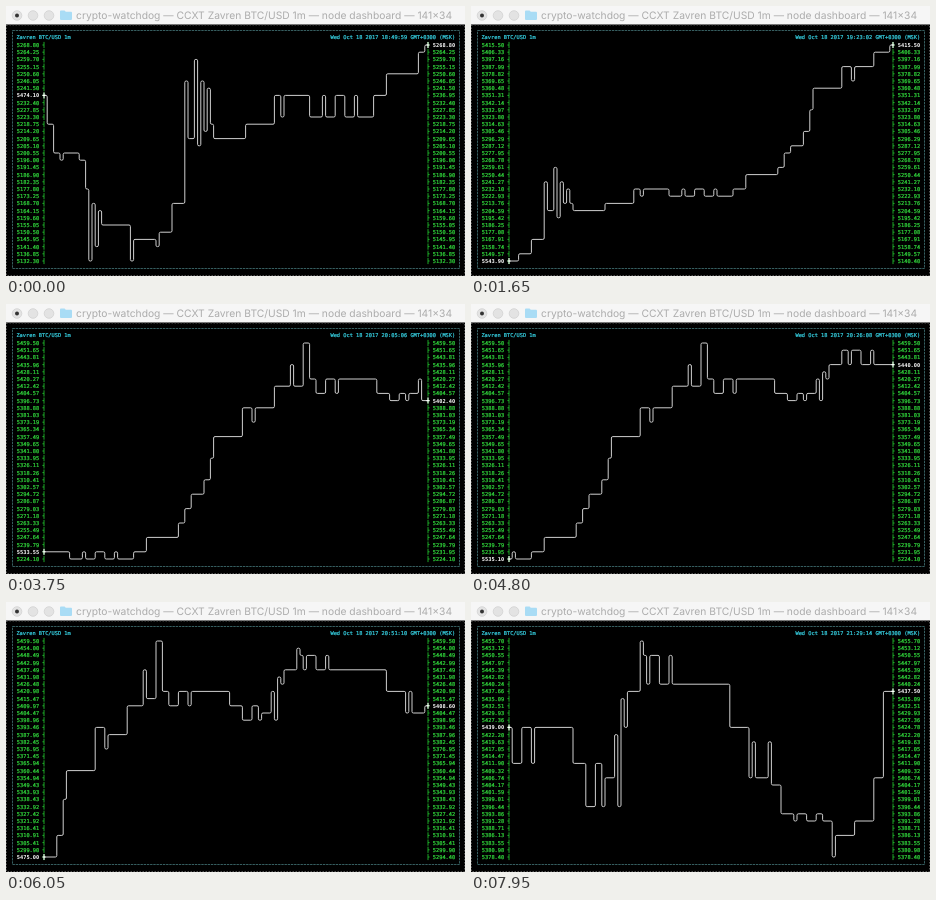
Write an HTML page that moves like this. It is 459 px wide and 270 px high and loops after 8000 ms.

```html
<!DOCTYPE html>
<html lang="en">
<head>
<meta charset="utf-8">
<title>Price dashboard</title>
<style>
  html, body { margin: 0; width: 100%; height: 100%; overflow: hidden; background: #000; }
  svg { display: block; width: 100vw; height: 100vh; }
  text { white-space: pre; text-rendering: geometricPrecision; }
  .bar { font: 10.3px Inter, "Liberation Sans", sans-serif; fill: #acacac; }
  .term { font: 5.32px "DejaVu Sans Mono", "Liberation Mono", monospace; stroke-width: .22px; }
  .head { fill: #35cbdc; stroke: #35cbdc; }
  .tick { fill: #2fd03a; stroke: #2fd03a; }
  .now { fill: #fff; font-weight: bold; }
</style>
</head>
<body>
<svg viewBox="0 0 459 270">
  <rect width="459" height="18.5" fill="#f6f6f6"/>
  <g fill="#e3e3e3" stroke="#d2d2d2" stroke-width=".8">
    <circle cx="11" cy="9.5" r="4.8"/>
    <circle cx="27" cy="9.5" r="4.8"/>
    <circle cx="43" cy="9.5" r="4.8"/>
  </g>
  <circle cx="11" cy="9.5" r="2" fill="#333"/>
  <path d="M54 5.5q0-1 1-1h3.5l1.3 1.3H65q1 0 1 1V13q0 1-1 1H55q-1 0-1-1z" fill="#a9dcf5"/>
  <text class="bar" x="70" y="13">crypto-watchdog — CCXT Zavren BTC/USD 1m — node dashboard — 141×34</text>
  <rect x=".5" y="19" width="458" height="250.5" fill="none" stroke="#666" stroke-width=".8" stroke-dasharray="1.5 1.5"/>
  <rect x="6.5" y="24.5" width="447" height="238" fill="none" stroke="#447679" stroke-width=".8" stroke-dasharray="2.4 .8"/>
  <g class="term">
    <text class="head" x="10.4" y="33">Zavren BTC/USD 1m</text>
    <text class="head" id="clock" x="449.2" y="33" text-anchor="end"></text>
    <g id="labels"></g>
  </g>
  <path id="axes" fill="none" stroke="#21b82c" stroke-width=".9"/>
  <path id="line" fill="none" stroke="#cfcfcf"/>
  <path id="marks" fill="none" stroke="#fff" stroke-width="1.1"/>
</svg>
<script>
const STEP = 50, STEPS = 160, POINTS = 120, ROWS = 30;
const LEFT = 38, CELL = 3.2, RIGHT = LEFT + POINTS * CELL, TOP = 39, ROW = 7.2;

// Key price levels: [first minute, price], held until the next one
const levels = [
  [0, 5237], [1, 5221], [3, 5200.5], [11, 5196], [13, 5154], [27, 5132.3], [28, 5147],
  [35, 5140.4], [36, 5150.5], [40, 5168.7], [44, 5246], [45, 5209], [47, 5228],
  [53, 5210.1], [63, 5218.7], [72, 5237], [83, 5224.1], [103, 5236], [107, 5250.6],
  [117, 5266], [119, 5282.5], [121, 5294.4], [125, 5311], [127, 5338], [128, 5360.2],
  [137, 5391], [140, 5375], [141, 5390], [147, 5411], [152, 5437.5], [153, 5417],
  [156, 5459.5], [158, 5423], [179, 5410], [188, 5396.4], [189, 5407], [194, 5425],
  [196, 5437], [200, 5455.7], [201, 5450.5], [210, 5440], [228, 5423], [234, 5406.5],
  [240, 5418.8], [241, 5402], [244, 5392.5], [257, 5390.8], [260, 5378.4], [261, 5385],
  [267, 5391], [273, 5406.5], [276, 5437.5], [279, 5437.5]
];
// Opening price of the longer series: [step, price]
const opens = [
  [0, 5474.1], [33, 5543.9], [54, 5532], [96, 5535.1], [121, 5475], [139, 5465], [159, 5439]
];

const prices = [];

// Quiet levels now and then touch the next level for a minute
for (let k = 0; k + 1 < levels.length; k++) {
  const [from, price] = levels[k], [end, next] = levels[k + 1];
  const restless = end - from > 3 && Math.abs(next - price) < 15;
  for (let i = from; i < end; i++) {
    const touch = restless && i > from && i < end - 1 && i * i % 23 < 3;
    prices.push(touch ? next : price);
  }
}

// Decaying swings from minute to minute
function burst(from, size) {
  for (let i = from; Math.abs(size) > 8; i++, size *= -0.78) prices[i] += size;
}
burst(13, 25);
burst(47, 31);
burst(192, 14);

const $ = id => document.getElementById(id);
const rowY = r => TOP + r * ROW;

function addLabel(x, row) {
  const el = document.createElementNS("http://www.w3.org/2000/svg", "text");
  el.setAttribute("x", x);
  el.setAttribute("y", rowY(row) + 2);
  return $("labels").appendChild(el);
}

const leftLabels = [], rightLabels = [];
let axes = "";
for (let r = 0; r <= ROWS; r++) {
  leftLabels.push(addLabel(LEFT - 27.2, r));
  rightLabels.push(addLabel(RIGHT + 4.8, r));
  const y = rowY(r);
  axes += `M${LEFT - 1.6} ${y}H${LEFT}M${LEFT} ${y - 3.1}v6.2` +
          `M${RIGHT + 1.6} ${y}H${RIGHT}M${RIGHT} ${y - 3.1}v6.2`;
}
$("axes").setAttribute("d", axes);

function openPrice(step) {
  let i = 1;
  while (step > opens[i][0]) i++;
  const [a, from] = opens[i - 1], [b, to] = opens[i];
  return from + (to - from) * (step - a) / (b - a);
}

function clockText(step) {
  const s = 67799 + Math.round(step * 60.095);
  const hms = [s / 3600, s / 60 % 60, s % 60].map(n => String(Math.floor(n)).padStart(2, "0"));
  return `Wed Oct 18 2017 ${hms.join(":")} GMT+0300 (MSK)`;
}

// The newest minute is still forming, so it has only started towards its close
function visible(step) {
  const series = prices.slice(step, step + POINTS);
  const [prev, close] = series.slice(-2);
  series[POINTS - 1] = Math.round((prev + 0.17 * (close - prev)) * 10) / 10;
  return series;
}

function linePath(rows) {
  const c = 1.4;
  let d = `M${LEFT} ${rowY(rows[0])}`;
  for (let i = 1; i < rows.length; i++) {
    if (rows[i] === rows[i - 1]) continue;
    const x = LEFT + i * CELL, a = rowY(rows[i - 1]), b = rowY(rows[i]);
    const k = b > a ? c : -c;
    d += `L${x - c} ${a}Q${x} ${a} ${x} ${a + k}V${b - k}Q${x} ${b} ${x + c} ${b}`;
  }
  return d + `H${RIGHT}`;
}

function setLabel(el, price, now) {
  el.textContent = price.toFixed(2);
  el.setAttribute("class", now ? "now" : "tick");
}

const cross = (x, y) => `M${x - 1.6} ${y}h3.2M${x} ${y - 3}v6`;

function draw(step) {
  const series = visible(step);
  const min = Math.min(...series), max = Math.max(...series);
  const ratio = ROWS / (max - min), top = Math.round(max * ratio);
  const rows = series.map(p => top - Math.round(p * ratio));
  const first = rows[0], last = rows[POINTS - 1];
  for (let r = 0; r <= ROWS; r++) {
    const price = max - r / ratio;
    setLabel(leftLabels[r], r === first ? openPrice(step) : price, r === first);
    setLabel(rightLabels[r], r === last ? series[POINTS - 1] : price, r === last);
  }
  $("clock").textContent = clockText(step);
  $("line").setAttribute("d", linePath(rows));
  $("marks").setAttribute("d", cross(LEFT, rowY(first)) + cross(RIGHT, rowY(last)));
}

let shown = -1;
const start = performance.now();
function tick() {
  const step = Math.floor((performance.now() - start) / STEP) % STEPS;
  if (step !== shown) draw(shown = step);
  requestAnimationFrame(tick);
}
tick();
</script>
</body>
</html>
```
